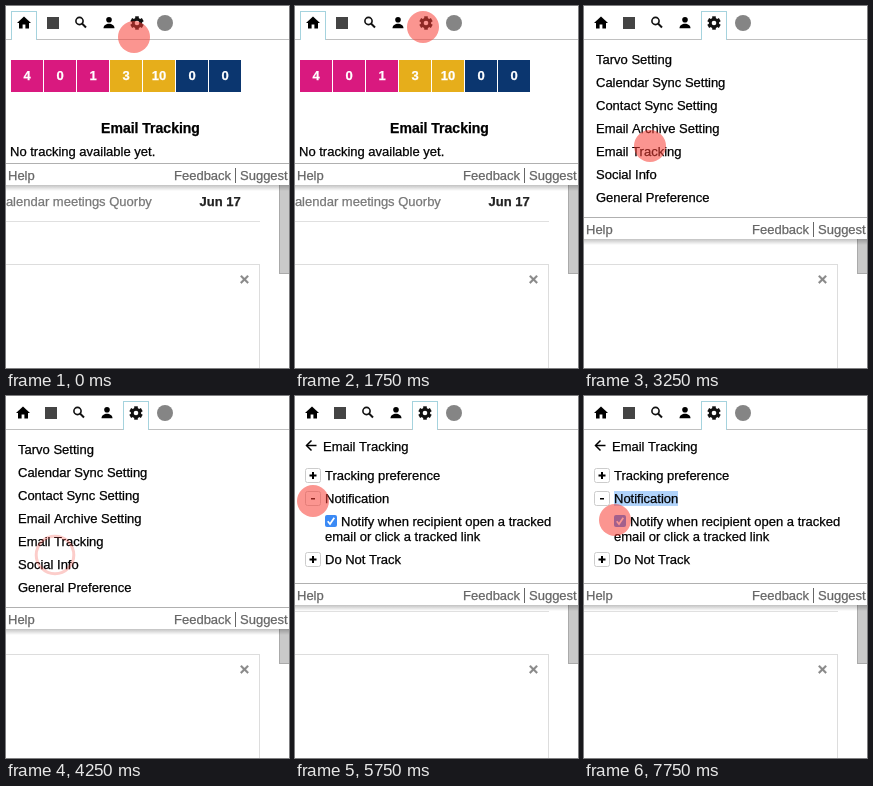
These frames come from a looping animation (283x362 px, 8 s). An HTML page with a canvas:

```html
<!DOCTYPE html>
<html lang="en">
<head>
<meta charset="utf-8">
<title>Email tracking settings</title>
<style>
  html, body { margin: 0; width: 100%; height: 100%; overflow: hidden; background: #fff; }
  canvas { display: block; width: 283px; height: 362px; }
</style>
</head>
<body>
<canvas id="stage"></canvas>
<script>
const W = 283, H = 362, LOOP = 8000, STEP = 250;
const FONT = '"Liberation Sans", Arial, sans-serif';
const canvas = document.getElementById('stage');
const c = canvas.getContext('2d');
const scale = window.devicePixelRatio || 1;
canvas.width = W * scale;
canvas.height = H * scale;

// Pointer path: time, x, y, eased in between
const path = [
  [1250, 128, 31], [1750, 128, 21], [2500, 128, 21], [3250, 66, 140], [3500, 49, 143],
  [4750, 49, 143], [5600, 18, 105], [6750, 18, 105], [7250, 31, 124]
];
const clicks = [250, 2250, 4250, 6500, 7250];

// Panel shown from each time on
const views = [[0, 'home'], [2250, 'menu'], [4500, 'open'], [6500, 'closed'], [7000, 'selected']];
const footerTop = { home: 157, menu: 211, open: 187, closed: 149, selected: 187 };

const menu = ['Tarvo Setting', 'Calendar Sync Setting', 'Contact Sync Setting',
  'Email Archive Setting', 'Email Tracking', 'Social Info', 'General Preference'];

const ease = p => p * p * (3 - 2 * p);

function pointerAt(t) {
  const next = path.findIndex(k => k[0] > t);
  const b = path.at(next), a = path[next - 1] || b;
  const p = a === b ? 1 : ease((t - a[0]) / (b[0] - a[0]));
  return [1, 2].map(i => Math.round(a[i] + (b[i] - a[i]) * p));
}

function rect(x, y, w, h, color) {
  c.fillStyle = color;
  c.fillRect(x, y, w, h);
}

function text(s, x, y, color = '#000', font = '13px', align = 'left') {
  c.font = font + ' ' + FONT;
  c.textAlign = align;
  c.fillStyle = c.strokeStyle = color;
  c.fillText(s, x, y);
  // Slight thickening for the heavier desktop text look
  c.lineWidth = 0.25;
  c.strokeText(s, x, y);
}

function disc(x, y, r, color) {
  c.fillStyle = color;
  c.beginPath();
  c.arc(x, y, r, 0, Math.PI * 2);
  c.fill();
}

function ring(x, y, r, color, width) {
  c.beginPath();
  c.arc(x, y, r, 0, Math.PI * 2);
  c.strokeStyle = color;
  c.lineWidth = width;
  c.stroke();
}

function line(points, color, width) {
  c.beginPath();
  points.forEach(p => c.lineTo(...p));
  c.strokeStyle = color;
  c.lineWidth = width;
  c.stroke();
}

function roundBox(x, y, w, h, fill, border) {
  c.beginPath();
  c.roundRect(x, y, w, h, 2);
  c.fillStyle = fill;
  c.fill();
  if (!border) return;
  c.strokeStyle = border;
  c.lineWidth = 1;
  c.stroke();
}

function page() {
  rect(0, 0, W, H, '#fff');
  rect(0, 177, 254, 1, '#e0e0e0');
  text('Calendar meetings Quorby', -9.5, 200, '#777');
  text('Jun 17', 193.5, 200, '#222', 'bold 13px');
  rect(0, 215, 254, 1, '#e0e0e0');
  rect(0, 258, 254, 1, '#ddd');
  rect(253, 258, 1, H - 258, '#ddd');
  text('×', 238.5, 279, '#888', 'bold 17px', 'center');
  rect(273, 100, 10, 168, '#aaa');
  rect(274, 100, 9, 167, '#c9c9c9');
}

function footer(y) {
  const shade = c.createLinearGradient(0, y + 22, 0, y + 28);
  shade.addColorStop(0, 'rgba(0,0,0,.24)');
  shade.addColorStop(1, 'rgba(0,0,0,0)');
  rect(0, y + 22, W, 6, shade);
  rect(0, 0, W, y + 22, '#fff');
  rect(0, y, W, 1, '#b0b0b0');
  text('Help', 2, y + 17, '#666');
  text('Feedback', 168, y + 17, '#666');
  rect(229, y + 5, 1, 15, '#666');
  text('Suggest', 234, y + 17, '#666');
}

// Icons are drawn around the origin
function house() {
  c.fillStyle = '#000';
  c.beginPath();
  c.moveTo(0, -6.5);
  c.lineTo(7, 0);
  c.lineTo(-7, 0);
  c.fill();
  c.fillRect(-5, -1, 3.6, 6.5);
  c.fillRect(1.4, -1, 3.6, 6.5);
  c.fillRect(-5, -1, 10, 2.5);
}

function block() {
  rect(-6, -6, 12, 12, '#444');
}

function magnifier() {
  ring(-1.5, -2, 3.6, '#111', 1.6);
  line([[1, 0.5], [5, 4.5]], '#111', 2);
}

function person() {
  disc(0, -3.2, 2.8, '#000');
  c.beginPath();
  c.moveTo(-5.5, 5.3);
  c.bezierCurveTo(-5.5, -0.8, 5.5, -0.8, 5.5, 5.3);
  c.fill();
}

function gear() {
  for (let i = 0; i < 3; i++) {
    const a = Math.PI / 2 + i * Math.PI / 3, x = Math.cos(a) * 6.7, y = Math.sin(a) * 6.7;
    line([[-x, -y], [x, y]], '#111', 3.6);
  }
  disc(0, 0, 5.2, '#111');
  disc(0, 0, 2.3, '#fff');
}

function ball() {
  disc(0, 0, 8, '#858585');
}

const icons = [house, block, magnifier, person, gear, ball];

// The active tab has a border and is 2px wider than the others
function nav(active) {
  rect(0, 33, W, 1, '#c0c0c0');
  let left = 3;
  for (const icon of icons) {
    const on = icon === active, width = on ? 30 : 28;
    if (on) {
      rect(left + 2, 5, 26, 29, '#a5d3de');
      rect(left + 3, 6, 24, 28, '#fff');
    }
    c.save();
    c.translate(left + width / 2, 17);
    icon();
    c.restore();
    left += width;
  }
}

function home() {
  [4, 0, 1, 3, 10, 0, 0].forEach((n, i) => {
    rect(5 + i * 33, 54, 32, 32, i < 3 ? '#d9197f' : i < 5 ? '#e6ae1b' : '#0b366f');
    text(n, 21 + i * 33, 74, '#fff', 'bold 13px', 'center');
  });
  text('Email Tracking', 144.5, 127, '#000', 'bold 14px', 'center');
  text('No tracking available yet.', 4, 150);
}

function option(y, label, sign, active) {
  const ink = active ? '#fff' : '#000';
  roundBox(10.5, y - 6.5, 15, 14, active ? '#1a0d1c' : '#fff', '#ccc');
  if (sign === '+') {
    rect(14.5, y - 0.5, 7, 2, ink);
    rect(17, y - 3, 2, 7, ink);
  } else {
    rect(16, y, 4, 1.5, ink);
  }
  text(label, 30, y + 5);
}

function tracking(view) {
  const open = view !== 'closed';
  line([[21.5, 49.5], [12, 49.5]], '#000', 1.5);
  line([[16.5, 44.5], [11.5, 49.5], [16.5, 54.5]], '#000', 1.5);
  text('Email Tracking', 28, 55);
  option(79, 'Tracking preference', '+');
  if (view === 'selected') rect(30, 95, 64, 15, '#b0d3fb');
  option(102, 'Notification', open ? '-' : '+', !open);
  if (open) {
    roundBox(30, 119, 12, 12, '#3b8af5');
    line([[32.7, 125.3], [35, 128], [39.3, 121.8]], '#fff', 1.7);
    text('Notify when recipient open a tracked', 46, 130);
    text('email or click a tracked link', 30, 145);
  }
  option(open ? 163 : 125, 'Do Not Track', '+');
}

// A click swaps the dot for a ring that grows and fades
function touch(t) {
  const [x, y] = pointerAt(t);
  const click = clicks.findLast(k => k <= t);
  const age = (t - click) / STEP;
  if (age < 2) ring(x, y + 16, 18.8 + 2.2 * age, `rgba(244,70,60,${0.27 - 0.11 * age})`, 3);
  else disc(x, y, 16, 'rgba(248,62,52,.55)');
}

function draw(now) {
  const t = Math.floor(now % LOOP / STEP) * STEP;
  const view = views.findLast(v => v[0] <= t)[1];
  c.setTransform(scale, 0, 0, scale, 0, 0);
  page();
  footer(footerTop[view]);
  nav(view === 'home' ? house : gear);
  if (view === 'home') home();
  else if (view === 'menu') menu.forEach((s, i) => text(s, 12, 58 + i * 23));
  else tracking(view);
  touch(t);
}

const start = performance.now();
function tick() {
  draw(performance.now() - start);
  requestAnimationFrame(tick);
}
tick();
</script>
</body>
</html>
```
